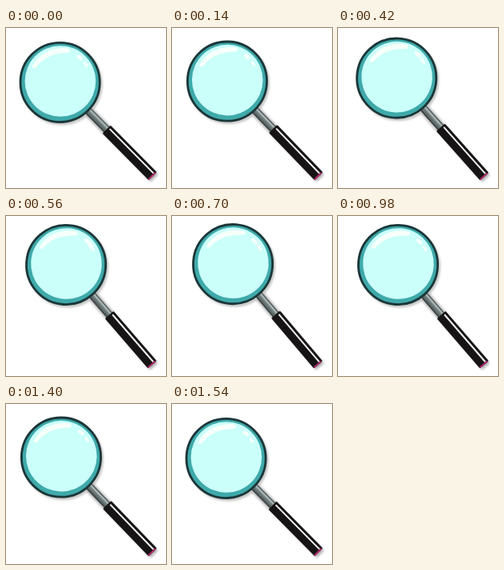
Recreate the animation shown at these times as an HTML page. Size 200x200 px, loop 1.61 s.

```html
<!DOCTYPE html>
<html>
<head>
<meta charset="utf-8">
<style>
  html, body { margin: 0; width: 100%; height: 100%; overflow: hidden; background: #fff; }
  svg { display: block; width: 100vw; height: 100vh; }
</style>
</head>
<body>
<svg viewBox="0 0 200 200">
  <defs>
    <linearGradient id="steel" x2="0" y2="1">
      <stop offset="0" stop-color="#303838"/>
      <stop offset=".25" stop-color="#b9c4c4"/>
      <stop offset=".45" stop-color="#758282"/>
      <stop offset=".8" stop-color="#566060"/>
      <stop offset="1" stop-color="#252b2b"/>
    </linearGradient>
    <radialGradient id="rim" gradientUnits="userSpaceOnUse" r="50">
      <stop offset=".86" stop-color="#8eeae6"/>
      <stop offset="1" stop-color="#3fa9aa"/>
    </radialGradient>
    <filter id="soft" x="-20%" y="-20%" width="140%" height="140%">
      <feGaussianBlur stdDeviation="1.5"/>
    </filter>
  </defs>

  <g transform="translate(2 2.5)" opacity=".3">
    <g class="pose" filter="url(#soft)">
      <circle r="49" fill="none" stroke="#000" stroke-width="3"/>
      <path d="M50 0H165" stroke="#000" stroke-width="13"/>
    </g>
  </g>

  <g class="pose">
    <rect x="49" y="-4.8" width="35" height="9.6" fill="url(#steel)"/>
    <rect x="82.5" y="-7.2" width="82.5" height="14.4" rx="1.5" fill="#161414"/>
    <path d="M85 -3.2H163" stroke="#f4f4f4" stroke-width="2"/>
    <path d="M164 -5.5V6.5" stroke="#b8246f" stroke-width="1.8"/>

    <g transform="rotate(-45.3)">
      <circle r="49.6" fill="url(#rim)" stroke="#1b3638" stroke-width="2.8"/>
      <circle cx=".3" cy="-1.5" r="44.3" fill="#cafffa"/>
      <g fill="#f6fffa">
        <path d="M-35 -20Q-22 -44 8 -43Q16 -41 10 -37Q-16 -37 -30 -19Q-34 -16 -35 -20Z"/>
        <ellipse rx="4.5" ry="2.4" transform="translate(24.5 -31) rotate(38)"/>
        <ellipse rx="4" ry="1.7" transform="translate(32 -22.5) rotate(55)"/>
        <path id="glint" d="M29 -33L30.5 -27.5L35 -26L30.5 -24.5L29 -19L27.5 -24.5L23 -26L27.5 -27.5Z"/>
      </g>
    </g>
  </g>
</svg>
<script>
  const LOOP = 1610, STEP = 70;
  const PIVOT = [175.1, 176.8], REACH = 153;
  const poses = document.querySelectorAll('.pose');
  const glint = document.getElementById('glint');

  // The whole glass tilts rigidly around a point low in the grip.
  function draw(now) {
    const t = Math.floor(now % LOOP / STEP) * STEP;
    const swing = Math.sin(Math.PI * (t + STEP / 2) / LOOP) ** 1.6;
    const turn = 45.3 + 4.45 * swing;
    const place = `translate(${PIVOT}) rotate(${turn}) translate(${-REACH})`;
    poses.forEach(p => p.setAttribute('transform', place));
    glint.setAttribute('opacity', Math.max(0, 1 - Math.abs(t - 560) / 240));
    requestAnimationFrame(draw);
  }
  requestAnimationFrame(draw);
</script>
</body>
</html>
```
